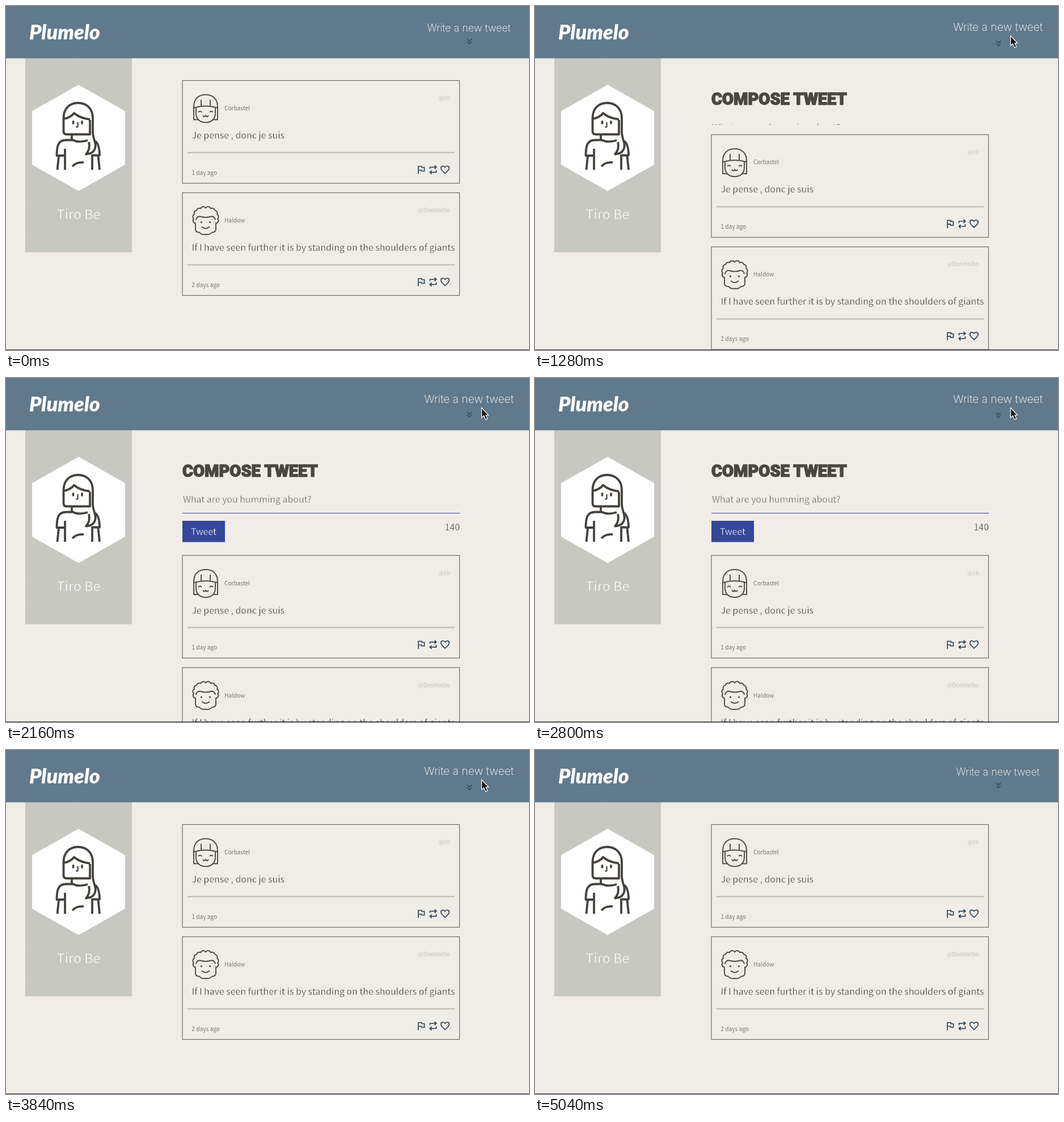
Animation of 922x607 px, one loop 5120 ms. Source, as an HTML page:

```html
<!DOCTYPE html>
<html lang="en">
<head>
<meta charset="utf-8">
<title>Compose box</title>
<style>
  /* How far the compose box is unfolded, 0 to 1. */
  @property --open { syntax: "<number>"; inherits: true; initial-value: 0; }

  html, body { margin: 0; width: 100%; height: 100%; overflow: hidden; background: #f0ece7; }
  .stage { position: relative; width: 922px; height: 607px; overflow: hidden; }
  svg { position: absolute; left: 0; top: 0; }
  /* A stroke in the backdrop colour thins the letters. */
  text {
    font: 300 15.9px "Noto Sans CJK JP", "Noto Sans CJK SC", "Noto Sans CJK", "Open Sans", sans-serif;
    fill: #45433f; stroke: #f0ece7; stroke-width: .35;
  }
  .small { font-size: 10.1px; fill: #5d5b57; stroke-width: .2; }
  .handle { font-size: 10.1px; fill: #bdbab5; stroke-width: .2; text-anchor: end; }
  .logo { font: italic 900 36px Lato, sans-serif; fill: #fff; stroke: none; }
  .person { font-size: 23.4px; fill: #fff; stroke: #c8c8c2; stroke-width: .6; text-anchor: middle; }
  .write { font: 200 18px Inter, sans-serif; fill: #fff; stroke: none; text-anchor: middle; }
  .title { font: 900 29px Roboto, sans-serif; fill: #494742; stroke: #494742; stroke-width: 1.5; }
  .hint { fill: #6f6d69; }
  .button { fill: #fff; stroke: #344798; }
  .line { fill: none; stroke: #45423d; stroke-linejoin: round; }
  .face { stroke: #524f49; stroke-width: 2; }

  /* Everything shares one 5120 ms loop. */
  .stage, .write, .hoverShift, .bounce, .cursor { animation: 5120ms linear infinite; }

  .stage { animation-name: unfold; animation-timing-function: step-end; }
  .compose { position: absolute; left: 0; top: 115px; width: 922px; height: calc(var(--open) * 181.5px); overflow: hidden; }
  .cards { transform: translateY(calc(var(--open) * 181.5px)); }
  @keyframes unfold {
    0% { --open: 0; }
    23.4375% { --open: .146; }
    25% { --open: .526; }
    26.5625% { --open: .889; }
    28.125% { --open: 1; }
    60.9375% { --open: .965; }
    62.5% { --open: .674; }
    64.0625% { --open: .27; }
    65.625% { --open: .016; }
    67.1875%, 100% { --open: 0; }
  }

  .write { transform-origin: 816px 45px; animation-name: grow; }
  @keyframes grow {
    0%, 9.38% { transform: none; }
    10.94%, 82.03% { transform: translateY(-1px) scale(1.072); }
    83.6%, 100% { transform: none; }
  }
  .hoverShift { animation-name: drop; }
  @keyframes drop {
    0%, 9.38% { transform: translateY(-3px); }
    10.94%, 82.03% { transform: translateY(0); }
    83.6%, 100% { transform: translateY(-3px); }
  }
  .bounce { animation-name: bounce; animation-timing-function: cubic-bezier(.37, 0, .63, 1); }
  @keyframes bounce {
    0%, 100% { transform: translateY(1.5px); }
    10.94%, 37.5%, 64.06%, 90.63% { transform: translateY(0); }
    24.22%, 50.78%, 77.34% { transform: translateY(2px); }
  }

  .cursor { animation-name: visit; animation-timing-function: ease-in-out; }
  @keyframes visit {
    0%, 4.69% { transform: translate(90px, -12px); }
    12.5%, 79.69% { transform: translate(0, 0); }
    86.72%, 100% { transform: translate(90px, -10px); }
  }
</style>
</head>
<body>
<div class="stage">
  <svg width="922" height="607" viewBox="0 0 922 607">
    <defs>
      <g id="frame">
        <rect x="311" width="488.5" height="181.2" fill="none" stroke="#6f6d69" stroke-width="1.2"/>
        <path d="M320 127.3H791" stroke="#c3c3c0" stroke-width="2.4"/>
        <g fill="none" stroke="#2b465c" stroke-width="1.7">
          <path d="M727 165V151.5H733V153.5H737.5V160H732.5V158H727"/>
          <path d="M747.5 156V152.8H758M755.5 149.8L758.7 152.8L755.5 155.8M758.5 158V161.8H748M750.5 158.8L747.3 161.8L750.5 164.8"/>
          <path d="M774 163.8C768 158.7 766.7 157 766.7 154.5C766.7 150.5 771.5 149.3 774 153C776.5 149.3 781.3 150.5 781.3 154.5C781.3 157 780 158.7 774 163.8Z"/>
        </g>
      </g>
    </defs>

    <!-- sidebar -->
    <rect x="34" y="92" width="188" height="342.5" fill="#c8c8c2"/>
    <g id="specks" fill="#d6d5cf"></g>
    <path d="M128 139L210 185.5V280L128 326.5L46 280V185.5Z" fill="#fff"/>
    <g class="line" stroke-width="3.8">
      <path d="M101.5 206V198C101.5 181 112 171 127 171C142 171 153 181 153 198V222C153 234 159 240 157.5 249C156 257 150 261 141 261.5C146 256 148.5 250 146 240"/>
      <path d="M101.5 204V221Q101.5 226.500 107 226.500H148V201"/>
      <path d="M102 199Q114 197 120 189Q130 198 148 200"/>
      <path d="M116 227V235"/>
      <path d="M104 264H89.500C89.500 247 92 236.500 106 236.500H118Q128 242 144 237"/>
      <path d="M104 252V289M93 265L90.500 289"/>
      <path d="M157 238Q165 244 165 263.500H152M152 262V289M162.500 265L165 289"/>
      <path d="M117 283Q124 275 137 276"/>
      <path d="M126.500 205V213.500H123" stroke-width="2.2"/>
    </g>
    <g fill="#45423d"><ellipse cx="118.5" cy="205.500" rx="1.900" ry="3.500"/><ellipse cx="134" cy="205.500" rx="1.900" ry="3.500"/></g>
    <text class="person" x="128" y="375.500">Tiro Be</text>

    <!-- posts -->
    <g class="cards">
      <g transform="translate(0 131.500)">
        <use href="#frame"/>
        <g class="line face">
          <path d="M340 69H331V46C331 32 340 25 352 25S373 32 373 46V69H364"/>
          <path d="M335 47V58C335 68 342 74 352 74S369 68 369 58V47"/>
          <path d="M332 48Q352 42 372 48M344 34V44.500M360 34V44.500"/>
          <path d="M339 56q3-3.500 6 0M359 56q3-3.500 6 0M347 61.500q2.500 4.500 5 0q2.500 4.500 5 0"/>
        </g>
        <text class="small" x="385" y="52.500">Corbastel</text>
        <text class="handle" x="783" y="34.500">@cb</text>
        <text x="327.500" y="102.500">Je pense , donc je suis</text>
        <text class="small" x="327.500" y="166">1 day ago</text>
      </g>
      <g transform="translate(0 329.500)">
        <use href="#frame"/>
        <g class="line face">
          <path d="M334 54A4.800 4.800 0 0 1 331 46A4.800 4.800 0 0 1 332 38A4.800 4.800 0 0 1 336 31A4.800 4.800 0 0 1 343 28A5 5 0 0 1 352 27A5 5 0 0 1 361 28A4.800 4.800 0 0 1 368 31A4.800 4.800 0 0 1 372 38A4.800 4.800 0 0 1 373 46A4.800 4.800 0 0 1 370 54"/>
          <path d="M334 53V64Q334 70 341 70Q345 75 352 73.500Q359 75 363 70Q370 70 370 64V53"/>
          <path d="M335 48Q336 41 343 42Q352 45 361 42Q368 41 369 48M345 60Q352 66 359 60"/>
        </g>
        <g fill="#45423d"><circle cx="344.500" cy="52" r="1.600"/><circle cx="359.500" cy="52" r="1.600"/></g>
        <text class="small" x="385" y="52.500">Haldow</text>
        <text class="handle" x="783" y="34.500">@DonHalbo</text>
        <text x="327.500" y="102.500">If I have seen further it is by standing on the shoulders of giants</text>
        <text class="small" x="327.500" y="166">2 days ago</text>
      </g>
    </g>
  </svg>

  <div class="compose">
    <svg width="922" height="182" viewBox="0 115 922 182">
      <text class="title" x="311" y="173.500">COMPOSE TWEET</text>
      <text class="hint" x="312" y="220">What are you humming about?</text>
      <path d="M311 238.500H800" stroke="#3a4892" stroke-width="1.200"/>
      <rect x="311" y="252" width="75" height="37.500" fill="#344798"/>
      <text class="button" x="326" y="277">Tweet</text>
      <text x="800" y="269" text-anchor="end">140</text>
    </svg>
  </div>

  <svg width="922" height="607" viewBox="0 0 922 607">
    <rect width="922" height="92.300" fill="#617a8b"/>
    <text class="logo" x="41" y="59">Plumelo</text>
    <text class="write" x="816" y="45">Write a new tweet</text>
    <g class="hoverShift">
      <path class="bounce" d="M813 59.500L817 63.300L821 59.500M813 64.500L817 68.300L821 64.500" fill="none" stroke="#2f4a63" stroke-width="1.700"/>
    </g>
    <path class="cursor" d="M838.500 52.500V70L842.500 66.500L845.500 73.500L848.700 72L845.800 65.500H850.500Z" fill="#111" stroke="#fff" stroke-width="1.200"/>
    <rect y="606" width="922" height="1" fill="#333"/>
  </svg>
</div>
<script>
  // Faint paper grain on the sidebar.
  let seed = 7;
  const rand = () => (seed = seed * 16807 % 2147483647) / 2147483647;
  let grain = "";
  for (let i = 0; i < 45; i++) {
    const x = 36 + rand() * 183, y = 94 + rand() * 337;
    grain += `<circle cx="${x}" cy="${y}" r="${0.4 + rand() * 0.5}"/>`;
  }
  document.getElementById("specks").innerHTML = grain;
</script>
</body>
</html>
```
